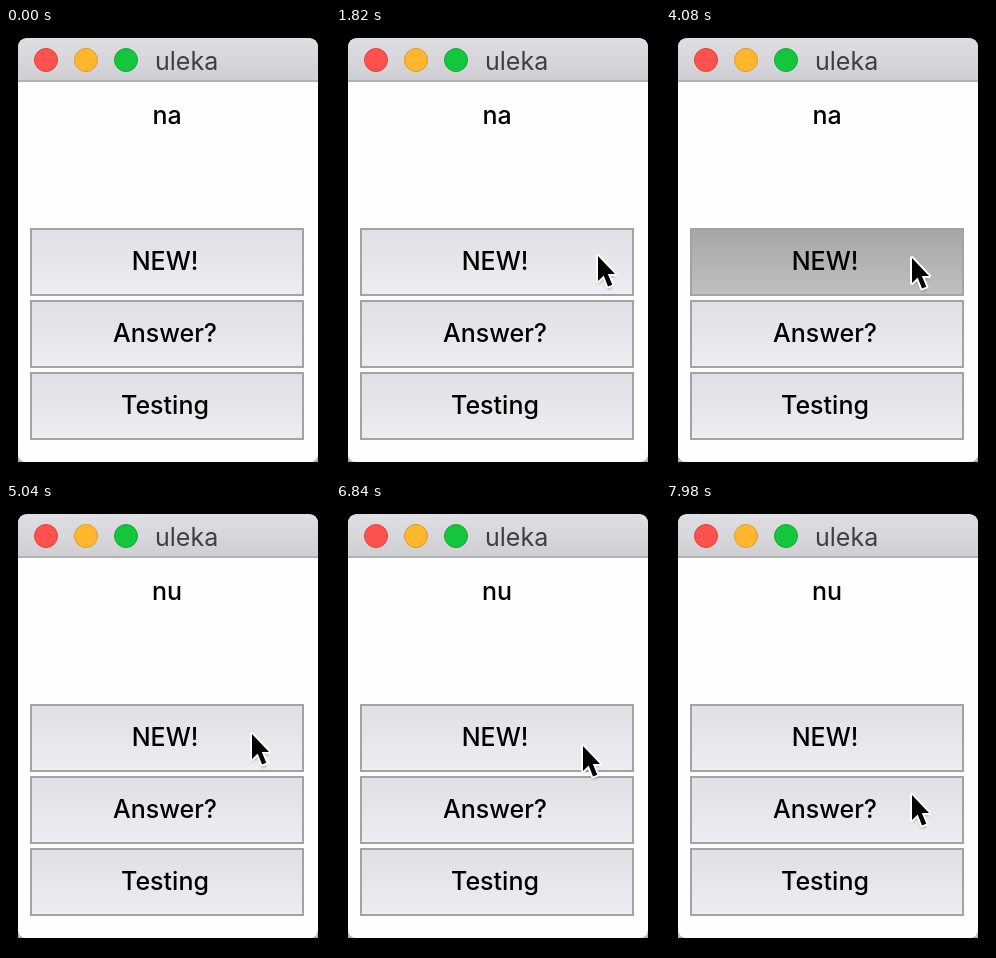
An HTML page for the animation above (8000 ms loop, 324 by 448 pixels).

```html
<!DOCTYPE html>
<html lang="en">
<head>
<meta charset="utf-8">
<title>Syllable window</title>
<style>
html, body { margin: 0; width: 100%; height: 100%; overflow: hidden; background: #000; }
svg { display: block; width: 324px; height: 448px; }
text { font: 500 25px Inter, "Open Sans", sans-serif; fill: #000; }
.mid { text-anchor: middle; }
.title { font-weight: 400; fill: #3f3f43; }
</style>
</head>
<body>
<svg viewBox="0 0 324 448">
  <defs>
    <linearGradient id="bar" x2="0" y2="1">
      <stop stop-color="#dedee3"/>
      <stop offset="1" stop-color="#cfcfd3"/>
    </linearGradient>
    <linearGradient id="face" x2="0" y2="1">
      <stop stop-color="#dfdfe4"/>
      <stop offset="1" stop-color="#eeeef2"/>
    </linearGradient>
    <linearGradient id="down" x2="0" y2="1">
      <stop stop-color="#a6a6a9"/>
      <stop offset="1" stop-color="#c0c0c3"/>
    </linearGradient>
    <filter id="soft" x="-50%" y="-50%" width="200%" height="200%">
      <feGaussianBlur stdDeviation="1.5"/>
    </filter>
    <clipPath id="win"><path d="M12 434V20Q12 10 22 10H302Q312 10 312 20V434Z"/></clipPath>
    <path id="arrow" d="M0 0V25L5.7 19.5L10 30.5L14.3 28.7L9.8 18H17Z"/>
  </defs>

  <g clip-path="url(#win)">
    <rect x="12" y="400" width="300" height="34" fill="#b4b4b6"/>
    <rect x="12" y="10" width="300" height="424" rx="8" fill="#fefefe"/>
    <rect x="12" y="10" width="300" height="43" fill="url(#bar)"/>
    <rect x="12" y="52" width="300" height="2" fill="#b2b2b5"/>
  </g>
  <circle cx="40" cy="32" r="11.5" fill="#ff524f" stroke="#e0403e"/>
  <circle cx="80" cy="32" r="11.5" fill="#ffb72e" stroke="#df9c22"/>
  <circle cx="120" cy="32" r="11.5" fill="#14c63c" stroke="#10a932"/>
  <text class="title" x="149" y="42">uleka</text>
  <text id="label" class="mid" x="161" y="96">na</text>
  <g id="buttons"></g>
  <g id="cursor">
    <use href="#arrow" y="3" fill="#000" opacity=".35" filter="url(#soft)"/>
    <use href="#arrow" fill="#000" stroke="#fff" stroke-width="4" stroke-linejoin="round"/>
    <use href="#arrow" fill="#000"/>
  </g>
</svg>
<script>
const LOOP = 8000, ENTER = 840, PRESS = 4080, RELEASE = 4360, FADE = 140;
const $ = id => document.getElementById(id);
const clamp = k => Math.min(1, Math.max(0, k));

const linear = k => k;
const easeIn = k => k * k;
const easeOut = k => 1 - (1 - k) ** 3;
const smooth = k => k * k * (3 - 2 * k);

$('buttons').innerHTML = ['NEW!', 'Answer?', 'Testing'].map((name, i) => `
  <g transform="translate(24 ${200 + 72 * i})">
    <rect x="1" y="1" width="272" height="66" fill="url(#face)" stroke="#a3a3a5" stroke-width="2"/>
    ${i ? '' : '<rect id="press" x="2" y="2" width="270" height="64" fill="url(#down)"/>'}
    <text class="mid" x="135" y="42">${name}</text>
  </g>`).join('');

// each move starts where the one before it ended; sway bulges to the right
const moves = [
  { from: ENTER, to: 1560, x: 264, y: 228, ease: easeOut },
  { from: 1660, to: 2360, x: 246, y: 230, ease: smooth, easeX: smooth },
  { from: 6180, to: 6980, x: 246, y: 248, ease: easeIn, sway: 17 },
  { from: 7000, to: 7720, x: 246, y: 284, ease: smooth },
  { from: 7820, to: 7980, x: 246, y: 291, ease: smooth }
];

function tipAt(t) {
  let x = 320, y = 282;
  for (const m of moves) {
    const k = clamp((t - m.from) / (m.to - m.from));
    x += (m.x - x) * (m.easeX || linear)(k) + (m.sway || 0) * Math.sin(Math.PI * k) ** 4;
    y += (m.y - y) * m.ease(k);
  }
  return [x, y].map(Math.round);
}

function draw(t) {
  $('cursor').style.display = t < ENTER ? 'none' : '';
  $('cursor').setAttribute('transform', `translate(${tipAt(t)})`);
  $('press').setAttribute('opacity', t < PRESS ? 0 : 1 - clamp((t - RELEASE) / FADE));
  $('label').textContent = t < RELEASE ? 'na' : 'nu';
}

const start = performance.now();
function tick() {
  draw((performance.now() - start) % LOOP);
  requestAnimationFrame(tick);
}
tick();
</script>
</body>
</html>
```
